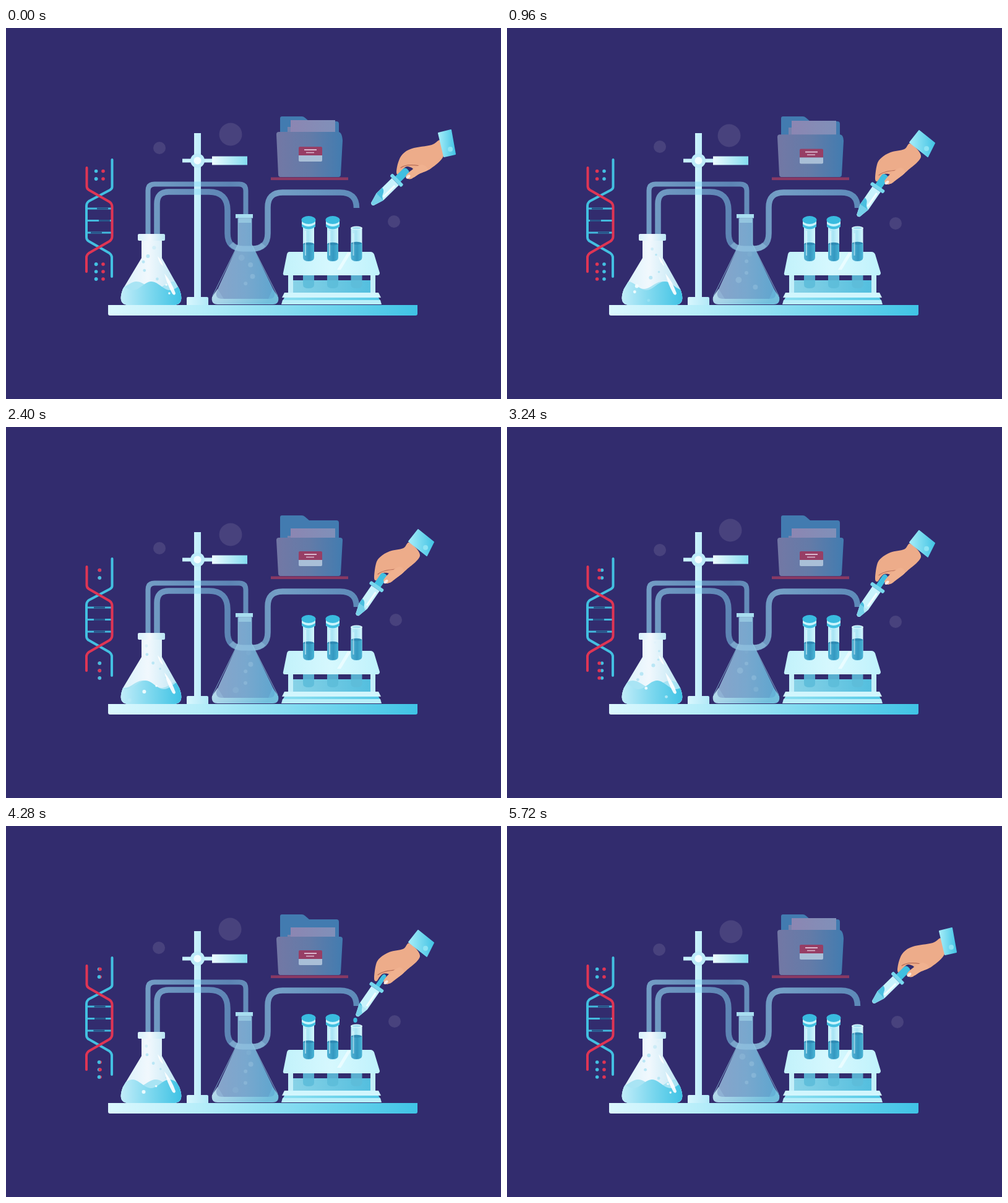
Recreate the animation shown at these times as an HTML page. Size 800x600 px, loop 5760 ms.

```html
<!DOCTYPE html>
<html lang="en">
<head>
<meta charset="utf-8">
<title>Laboratory</title>
<style>
html, body { margin: 0; width: 100%; height: 100%; overflow: hidden; background: #322c6e; }
svg { display: block; width: 800px; height: 600px; }
</style>
</head>
<body>
<svg viewBox="0 0 800 600" fill="none">
  <defs>
    <linearGradient id="table"><stop stop-color="#dcf8fe"/><stop offset=".3" stop-color="#b5edf9"/><stop offset="1" stop-color="#3fc3e5"/></linearGradient>
    <linearGradient id="pole"><stop stop-color="#d9f7fe"/><stop offset="1" stop-color="#b2e9f8"/></linearGradient>
    <linearGradient id="grip"><stop stop-color="#edfcff"/><stop offset="1" stop-color="#84dcf0"/></linearGradient>
    <linearGradient id="glass"><stop stop-color="#d8f1fb"/><stop offset=".45" stop-color="#f1f8fd"/><stop offset="1" stop-color="#b9e4f3"/></linearGradient>
    <linearGradient id="liquid"><stop stop-color="#c9effa"/><stop offset=".5" stop-color="#7bd7ee"/><stop offset="1" stop-color="#37c0e3"/></linearGradient>
    <linearGradient id="cone"><stop stop-color="#8faed2"/><stop offset=".5" stop-color="#7fb2d6"/><stop offset="1" stop-color="#62b0d7"/></linearGradient>
    <linearGradient id="rim" x2="1" y2=".3"><stop stop-color="#d0f2fb"/><stop offset="1" stop-color="#79d0e9"/></linearGradient>
    <linearGradient id="hose" gradientUnits="userSpaceOnUse" x1="225" x2="570" y1="0" y2="0"><stop stop-color="#9be3fa" stop-opacity=".62"/><stop offset=".4" stop-color="#85d6f5" stop-opacity=".52"/><stop offset=".62" stop-color="#9be3fa" stop-opacity=".63"/><stop offset="1" stop-color="#80d6f5" stop-opacity=".55"/></linearGradient>
    <linearGradient id="front"><stop stop-color="#7378a5"/><stop offset=".5" stop-color="#637ba8"/><stop offset="1" stop-color="#427cb0"/></linearGradient>
    <linearGradient id="paper"><stop stop-color="#8c86b2"/><stop offset="1" stop-color="#8090b9"/></linearGradient>
    <linearGradient id="plate"><stop stop-color="#c2f2fb"/><stop offset=".5" stop-color="#d6f8fe"/><stop offset="1" stop-color="#bff2fc"/></linearGradient>
    <linearGradient id="shelf"><stop stop-color="#8fe0f1"/><stop offset="1" stop-color="#56cbe8"/></linearGradient>
    <linearGradient id="tube"><stop stop-color="#caf3fc"/><stop offset=".45" stop-color="#a8e4f4"/><stop offset="1" stop-color="#d4f7fe"/></linearGradient>
    <linearGradient id="fluid"><stop stop-color="#52b3d5"/><stop offset=".55" stop-color="#3498c1"/><stop offset="1" stop-color="#49b4d5"/></linearGradient>
    <linearGradient id="cuffFill"><stop stop-color="#a5edf8"/><stop offset="1" stop-color="#44c4e5"/></linearGradient>
    <clipPath id="flaskClip"><path d="M219 344V372L189 422Q179 448 199 448H270Q290 448 280 422L252 372V344Z"/></clipPath>
    <clipPath id="barrelClip"><path d="M-8-55H8V-20L3-4Q0 0-3-4L-8-20Z"/></clipPath>
  </defs>

  <g id="orbs" fill="#48427d"><circle r="18.5"/><circle r="10"/><circle r="10"/></g>

  <g id="dna" stroke-width="4" stroke-linecap="round" stroke-linejoin="round">
    <g id="rungs" stroke-width="3" stroke-linecap="butt"></g>
    <path stroke="#43c0e1" d="M171.500 213V257Q171.500 260 168 262L134 280Q130 283 130 288V338Q130 343 134 345L167 364Q171 367 171 371V402"/>
    <path stroke="#df3554" d="M130.500 226V256Q130.500 260 134 262L167 281Q171.500 284 171.500 289V337Q171.500 342 167 345L134 364Q130 367 130 371V394"/>
    <g id="dots" stroke="none"></g>
  </g>

  <g id="folder">
    <path fill="#427bb0" d="M443 241V146Q443 143 446 143H478Q481 143 483 145L490 151H534Q538 151 538 155V241Z"/>
    <path id="sheetBack" fill="#7783ad" d="M455 160H532V200H455Z"/>
    <path id="sheet" fill="url(#paper)" d="M460 149H532V200H460Z"/>
    <path id="cover" fill="url(#front)"/>
    <g id="label">
      <path fill="#973e65" d="M475 192H509Q511 192 511 194V206H473V194Q473 192 475 192Z"/>
      <path fill="#a9bfd7" d="M473 206H511V214Q511 216 509 216H475Q473 216 473 214Z"/>
      <path stroke="#d9b7cd" stroke-width="2" d="M482 197H502"/>
      <path stroke="#d9b7cd" stroke-width="1.500" d="M485 201.500H498"/>
    </g>
    <path fill="#893963" d="M428 241.500H553V246H428Z"/>
  </g>

  <path fill="url(#table)" d="M165 448H665V462Q665 465 662 465H168Q165 465 165 462Z"/>

  <g id="stand">
    <path fill="url(#pole)" d="M304 170H315V436H304ZM294 435H325Q327 435 327 437V448H292V437Q292 435 294 435Z"/>
    <path fill="#c8f2fc" d="M285 211.500H334V217.500H285Z"/>
    <path fill="url(#grip)" d="M333 207.500H390V221.500H333Z"/>
    <circle cx="309.500" cy="214.500" r="11.500" fill="#bdebf9"/>
    <circle cx="309.500" cy="214.500" r="6" fill="#f2fdff"/>
  </g>

  <g stroke="url(#hose)">
    <path stroke-width="8" d="M229.500 334V263Q229.500 252.500 240 252.500H377Q387.500 252.500 387.500 263V303"/>
    <path stroke-width="9.500" d="M244 334V284Q244 265 263 265H328Q358 265 358 295V332Q358 357 383 357H398Q423 357 423 332V290Q423 266 447 266H540Q566.500 266 566.500 291"/>
  </g>

  <g id="flask">
    <path fill="url(#glass)" d="M219 344V372L189 422Q179 448 199 448H270Q290 448 280 422L252 372V344Z"/>
    <g clip-path="url(#flaskClip)">
      <path id="waveBack" fill="#a9e4f4"/>
      <path id="wave" fill="url(#liquid)"/>
      <g id="bubbles"></g>
      <path fill="#fff" opacity=".9" d="M245 369Q252 376 254 385Q247 380 245 369ZM256 397Q268 411 274 429Q273 434 269 430Q260 414 256 397Z"/>
    </g>
    <path fill="url(#glass)" d="M215 333H255Q257 333 257 335V342Q257 344 255 344H215Q213 344 213 342V335Q213 333 215 333Z"/>
  </g>

  <g id="beaker">
    <path fill="url(#rim)" fill-opacity=".9" d="M342 422L352 438H424L431 422L440 435Q442 447 431 447H342Q331 447 333 435Z"/>
    <path fill="url(#cone)" fill-opacity=".92" d="M375 308H397V350L434 427Q436 438 425 438H349Q338 438 340 427L375 350Z"/>
    <path stroke="#9ddcf0" stroke-opacity=".7" d="M375 308V350L334 433M397 308V350L439 433"/>
    <path fill="#a8def0" d="M371 301H399V307.500H371Z"/>
    <path fill="#a5d9ec" fill-opacity=".6" d="M376 307H396V315H376Z"/>
    <path stroke="#9ccbe5" stroke-opacity=".45" stroke-width="9" d="M364 349Q371 357 383 357H398Q410 357 416 350"/>
    <g id="fizz" fill="#a6cfe6"></g>
  </g>

  <g id="rack">
    <path fill="url(#shelf)" fill-opacity=".92" d="M463 408H590V430H463Z"/>
    <path fill="#c3eff9" d="M456 399H464V432H456ZM589 399H597V432H589Z"/>
    <g id="lower"></g>
    <path fill="#d1f6fd" d="M450 428H602L606 436H446Z"/>
    <path fill="url(#shelf)" d="M450 436H602L605 441H447Z"/>
    <path fill="#b9effa" d="M447 440H605L607 447H445Z"/>
    <path fill="url(#plate)" d="M458 362H589Q593 362 595 366L604 396Q604 400 600 400H451Q447 400 448 396L454 366Q455 362 458 362Z"/>
    <path fill="#f0fdff" opacity=".75" d="M552 363H558L541 391H535Z"/>
    <g id="tubes"></g>
  </g>

  <ellipse id="drop" rx="3.200" ry="4" fill="#3dbbdf"/>

  <g id="arm">
    <path id="hand" fill="#edac8a"/>
    <path id="crease" stroke="#b76d58" stroke-width="1.200" stroke-linecap="round"/>
    <path id="cuff" fill="url(#cuffFill)" stroke="url(#cuffFill)" stroke-width="2" stroke-linejoin="round"/>
    <circle id="button" r="4" fill="#8ee4f4"/>
    <g id="dropper">
      <path id="bulb" fill="#40bfe1" d="M-6-58V-78Q-6-83 0-83Q6-83 6-78V-58Z"/>
      <path fill="#c9f3fc" d="M-8-55H8V-20L3-3Q0 0-3-3L-8-20Z"/>
      <g clip-path="url(#barrelClip)"><path id="dose" fill="#4bbfe0"/></g>
      <path fill="#a3e4f4" d="M-8-20H8L3-3Q0 0-3-3Z" opacity=".5"/>
      <path stroke="#f2fdff" stroke-width="3" d="M4-50V-24"/>
      <path fill="#79d8ee" d="M-11-61H11Q13-61 13-58Q13-55 11-55H-11Q-13-55-13-58Q-13-61-11-61Z"/>
    </g>
    <path id="thumb" fill="#f0b18f"/>
    <ellipse id="nail" rx="4" ry="2.300" fill="#fbe7df"/>
  </g>
</svg>
<script>
const LOOP = 5760, TAU = Math.PI * 2;
const $ = id => document.getElementById(id);
const set = (el, attrs) => { for (const k in attrs) el.setAttribute(k, attrs[k]); };
const add = (parent, tag, attrs) => {
  const el = document.createElementNS('http://www.w3.org/2000/svg', tag);
  set(el, attrs);
  return parent.appendChild(el);
};
const clamp = v => Math.max(0, Math.min(1, v));
const ease = v => (1 - Math.cos(Math.PI * clamp(v))) / 2;
const ramp = (t, from, to) => ease((t - from) / (to - from));
const mix = (a, b, p) => a + (b - a) * p;
const mixAll = ([a, b], p) => a.map((v, i) => mix(v, b[i], p));

// Wandering orbs
const orbTimes = [0, 960, 2400, 3240, 4280, 4880, 5720];
const orbPaths = [
  [[363, 359, 363, 361, 362, 363, 362], [172, 174, 174, 167, 167, 173, 171]],
  [[248, 247, 248, 247, 247, 246, 246], [194, 192, 196, 199, 197, 191, 200]],
  [[627, 628, 630, 628, 628, 626, 631], [313, 316, 312, 315, 316, 310, 317]]
];
function track(t, values) {
  let i = 0;
  while (i < orbTimes.length - 2 && t > orbTimes[i + 1]) i++;
  return mix(values[i], values[i + 1], ramp(t, orbTimes[i], orbTimes[i + 1]));
}
function drawOrbs(t) {
  orbPaths.forEach(([x, y], i) => set($('orbs').children[i], { cx: track(t, x), cy: track(t, y) }));
}

// DNA
const rungs = [292, 311.5, 331].map(y => {
  add($('rungs'), 'path', { stroke: '#43b9dd', d: `M132 ${y}H170` });
  return { y, el: add($('rungs'), 'path', { stroke: '#285489' }) };
});
const pairs = [231.5, 244, 382, 394, 406].map((y, i) => {
  const dot = fill => add($('dots'), 'circle', { cy: y, r: 2.8, fill });
  return { redFront: i === 0 || i === 3, cyan: dot('#43c0e1'), red: dot('#df3554'), top: dot('#43c0e1') };
});
function drawDna(t) {
  const turn = 3 * TAU * t / LOOP, swing = Math.cos(turn), near = Math.sin(turn) < 0;
  pairs.forEach(p => {
    set(p.red, { cx: 151.3 + 5.7 * swing });
    set(p.cyan, { cx: 151.3 - 5.7 * swing });
    set(p.top, { cx: 151.3 - 5.7 * swing, opacity: near || p.redFront ? 0 : 1 });
  });
  rungs.forEach(({ y, el }, i) => {
    const mid = 151 + [5, 8, -5][i] * swing;
    set(el, { d: `M${mid - 9} ${y}H${mid + 9}` });
  });
}

// Folder
function drawFolder(t) {
  const open = ramp(t, 780, 1200) - ramp(t, 4360, 4800);
  const sink = ramp(t, 880, 1360) - ramp(t, 4360, 4820);
  const top = mix(168, 179, open), side = top + mix(14, 4, open);
  set($('cover'), { d: `M437 ${top + 4}Q437 ${top} 441 ${top}H${mix(537, 540, open)}Q${mix(543, 544, open)} ${top} 544 ${side}L541 237Q541 241 537 241H444Q440 241 440 237Z` });
  set($('sheet'), { transform: `translate(0 ${15 * sink})` });
  set($('sheetBack'), { transform: `translate(0 ${16 * sink})` });
  set($('label'), { transform: `translate(0 ${9 * open})` });
}

// Flask liquid
function wavePath(base, height, peak) {
  let d = 'M180 450';
  for (let x = 180; x <= 290; x += 3) d += `L${x} ${base - height * Math.cos(TAU * (x - peak) / 60)}`;
  return d + 'L290 450Z';
}
const bubbles = [...Array(8)].map(() => add($('bubbles'), 'circle', {}));
const fizz = [...Array(5)].map(() => add($('fizz'), 'circle', {}));
function drawFlasks(t) {
  const q = t / LOOP;
  set($('wave'), { d: wavePath(417, 7, 235 + 120 * q) });
  set($('waveBack'), { d: wavePath(416, 6, 211 - 120 * q) });
  bubbles.forEach((el, i) => {
    const p = (q * 3 + i * 0.381) % 1, y = mix(443, 346, p);
    const spread = y > 372 ? 12 + (y - 372) * 0.35 : 10;
    set(el, {
      cx: 236 + spread * Math.sin(i * 2.4 + p), cy: y, r: 1.8 + i % 3 * 0.6,
      fill: y > 410 ? '#f6feff' : '#b4e5f4',
      opacity: 0.9 * Math.min(1, p * 8, (1 - p) * 5)
    });
  });
  fizz.forEach((el, i) => {
    const p = (q * 3 + i * 0.42) % 1, y = mix(432, 360, p);
    set(el, {
      cx: 387 + (5 + (y - 360) * 0.2) * Math.sin(i * 2.1), cy: y, r: 3 + i % 3,
      opacity: 0.35 * Math.min(1, p * 6, (1 - p) * 4)
    });
  });
}

// Test tubes
const tubePath = (x, top, bottom) => `M${x - 9} ${top}H${x + 9}V${bottom - 6}Q${x + 9} ${bottom} ${x} ${bottom}Q${x - 9} ${bottom} ${x - 9} ${bottom - 6}Z`;
let sample, surface;
[489, 528, 566.5].forEach((x, i) => {
  const g = $('tubes'), open = i === 2, top = open ? 324 : 320;
  add($('lower'), 'path', { d: tubePath(x, 399, 421), fill: '#5dbcd9', 'fill-opacity': 0.9 });
  add(g, 'path', { d: tubePath(x, top, 378), fill: 'url(#tube)' });
  const fill = add(g, 'path', { d: tubePath(x, 349, 377), fill: 'url(#fluid)' });
  const face = add(g, 'ellipse', { cx: x, cy: 349, rx: 8.5, ry: 2.2, fill: '#2f8bb5' });
  add(g, 'path', { d: `M${x - 5} ${top + 8}V368`, stroke: '#eefcff', 'stroke-width': 2, opacity: 0.5 });
  if (open) {
    sample = fill;
    surface = face;
    add(g, 'ellipse', { cx: x, cy: 323.5, rx: 9.5, ry: 3, fill: '#ddf9fe' });
    add(g, 'ellipse', { cx: x, cy: 323.5, rx: 7, ry: 1.8, fill: '#a0dff0' });
  } else {
    add(g, 'path', { d: `M${x - 11} 310V321Q${x} 332 ${x + 11} 321V310Z`, fill: '#c8f4fd' });
    add(g, 'path', { d: `M${x - 11} 317Q${x} 325 ${x + 11} 317V321Q${x} 330 ${x - 11} 321Z`, fill: '#43c0e1' });
    add(g, 'ellipse', { cx: x, cy: 310.5, rx: 11.5, ry: 6.5, fill: '#39bbdf' });
  }
});

// Hand poses: away from the rack, then above it
const poses = {
  hand: [
    [702, 182, 688, 189, 656, 195, 641, 204, 634, 217, 631, 233, 634, 237, 641, 229, 648, 224, 658, 228, 654, 237, 658, 242, 668, 236, 687, 227, 707, 207],
    [652, 187, 642, 196, 620, 201, 605, 210, 598, 221, 595, 244, 599, 248, 604, 241, 610, 236, 620, 238, 616, 248, 620, 252, 630, 245, 647, 231, 669, 208]
  ],
  thumb: [
    [672, 221, 658, 228, 647, 238, 648, 243, 655, 244, 667, 236, 682, 229],
    [636, 226, 621, 235, 611, 246, 611, 250, 617, 253, 629, 245, 643, 234]
  ],
  crease: [[638, 226, 647, 219, 669, 223], [601, 238, 609, 231, 632, 230]],
  cuff: [[699, 170, 719, 165, 726, 204, 708, 208], [651, 185, 666, 166, 691, 186, 680, 208]],
  button: [[718, 196], [678, 195]],
  nail: [[650, 240.5], [614, 250]],
  dropper: [[590, 287, 45.5], [566, 306, 34.5]]
};
// Closed smooth curve through flat x, y points
function smooth(c) {
  const n = c.length / 2, at = i => { const k = (i + n) % n * 2; return [c[k], c[k + 1]]; };
  let d = `M${at(0)}`;
  for (let i = 0; i < n; i++) {
    const [a, b, e, f] = [-1, 0, 1, 2].map(k => at(i + k));
    d += `C${b.map((v, k) => v + (e[k] - a[k]) / 6)} ${e.map((v, k) => v - (f[k] - b[k]) / 6)} ${e}`;
  }
  return d + 'Z';
}

const squeezes = [1880, 3080, 4280];
function drawArm(t) {
  const p = ramp(t, 0, 820) - ramp(t, 5080, 5720);
  const pose = name => mixAll(poses[name], p);
  const squeeze = Math.max(...squeezes.map(s => ease(1 - Math.abs(t - s) / 380)));
  const spent = squeezes.reduce((sum, s) => sum + ramp(t, s - 150, s + 100), 0) - 3 * ramp(t, 5080, 5500);

  set($('arm'), { transform: `translate(0 ${2.8 * squeeze})` });
  set($('hand'), { d: smooth(pose('hand')) });
  set($('thumb'), { d: smooth(pose('thumb')) });
  const [a, b, c, d, e, f] = pose('crease');
  set($('crease'), { d: `M${a} ${b}Q${c} ${d} ${e} ${f}` });
  set($('cuff'), { d: `M${pose('cuff')}Z` });
  const [bx, by] = pose('button'), [nx, ny] = pose('nail');
  set($('button'), { cx: bx, cy: by });
  set($('nail'), { cx: nx, cy: ny, transform: `rotate(-40 ${nx} ${ny})` });
  const [x, y, tilt] = pose('dropper');
  set($('dropper'), { transform: `translate(${x} ${y}) rotate(${tilt})` });
  set($('bulb'), { transform: `scale(${1 - 0.4 * squeeze} 1)` });
  const level = -27 + 4 * spent;
  set($('dose'), { d: `M-10 ${level - 6}Q-3 ${level - 7} 0 ${level}T10 ${level + 7}V0H-10Z` });
}

function drawDrop(t) {
  const level = 348 - 4 * squeezes.reduce((sum, s) => sum + ramp(t, s + 140, s + 400), 0);
  set(sample, { d: tubePath(566.5, level, 377) });
  set(surface, { cy: level });
  const s = squeezes.find(v => t >= v - 160 && t < v + 150);
  const grow = s ? clamp((t - s + 160) / 140) : 0;
  const fall = s ? clamp((t - s) / 150) : 0;
  set($('drop'), { cx: 564.5, cy: 309 + 5 * grow + (level - 314) * fall * fall, rx: 3.2 * grow, ry: 4 * grow });
}

function frame() {
  const t = performance.now() % LOOP;
  drawOrbs(t);
  drawDna(t);
  drawFolder(t);
  drawFlasks(t);
  drawDrop(t);
  drawArm(t);
  requestAnimationFrame(frame);
}
frame();
</script>
</body>
</html>
```
